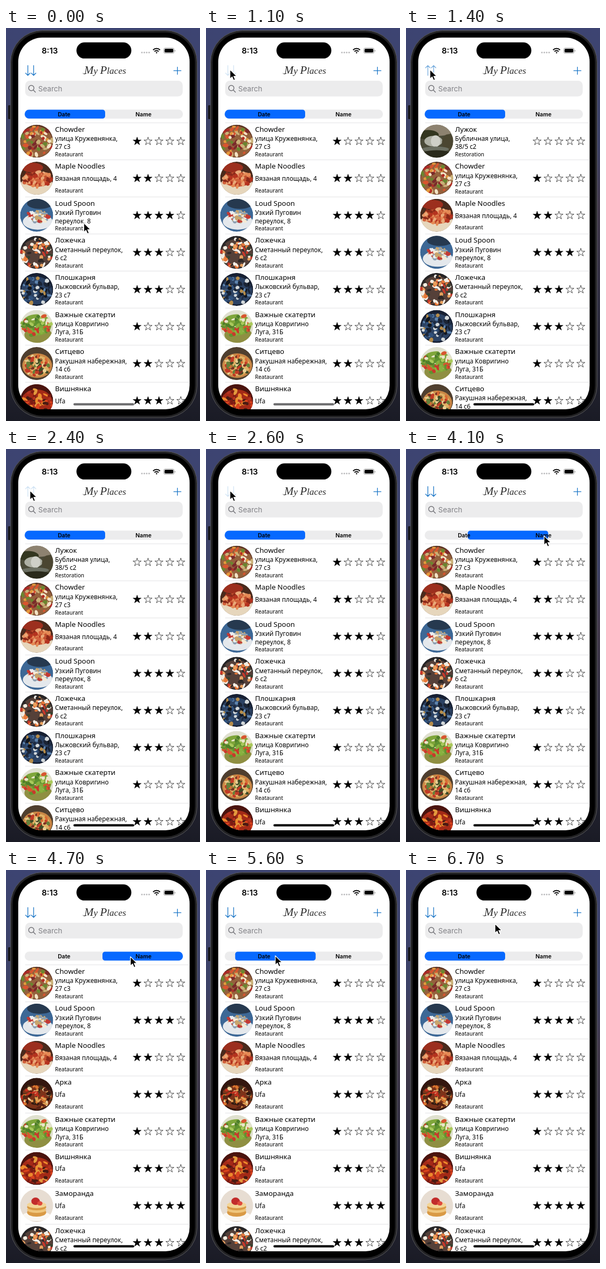
An HTML page that plays this animation: 364x738 px, repeating every 6800 ms.

```html
<!DOCTYPE html>
<html lang="ru">
<head>
<meta charset="utf-8">
<title>My Places</title>
<style>
  html, body { margin: 0; width: 100%; height: 100%; overflow: hidden; background: #1b1c27; }
  svg { display: block; width: 364px; height: 738px; }
  text { font-family: "Noto Sans", "Open Sans", sans-serif; fill: #000; }
  .ui { font-family: Inter, "Liberation Sans", sans-serif; }
  .script { font-family: "Liberation Serif", "Noto Serif", serif; font-style: italic; font-size: 17.5px; fill: #2a2a2a; }
  .script .cap { font-size: 21px; }
  .name { font-size: 13.3px; }
  .addr { font-size: 11.8px; }
  .kind { font-size: 10.1px; }
  .seg { font-size: 10.6px; font-weight: 600; text-anchor: middle; }
  .line { fill: none; stroke: #1874c6; stroke-width: 1.3; stroke-linecap: round; stroke-linejoin: round; }
</style>
</head>
<body>
<svg viewBox="0 0 364 738">
  <defs>
    <linearGradient id="wall" x1="0" y1="0" x2="0" y2="1">
      <stop offset="0" stop-color="#3d4472"/>
      <stop offset=".3" stop-color="#3d4266"/>
      <stop offset=".45" stop-color="#433a4c"/>
      <stop offset=".7" stop-color="#302f42"/>
      <stop offset="1" stop-color="#1a1b25"/>
    </linearGradient>
    <clipPath id="screen"><rect x="23" y="18" width="321.5" height="698" rx="45"/></clipPath>
    <clipPath id="disc"><circle cx="57.5" cy="34.5" r="31"/></clipPath>
    <clipPath id="track"><rect x="35" y="153.3" width="297" height="16.9" rx="8.4"/></clipPath>
    <path id="star" d=""/>
  </defs>

  <rect width="364" height="738" fill="url(#wall)"/>
  <rect x="4" y="145" width="6" height="26" rx="1.5" fill="#17171a"/>
  <rect x="8.5" y="4.5" width="350" height="727.5" rx="60" fill="#222224" stroke="#58585c"/>
  <rect x="12.5" y="8.5" width="342" height="719.5" rx="56" fill="#000"/>
  <rect x="23" y="18" width="321.5" height="698" rx="45" fill="#fff"/>

  <g clip-path="url(#screen)">
    <g id="lists"></g>

    <text class="ui" x="67" y="47.5" font-size="15" font-weight="600">8:13</text>
    <rect x="132.2" y="27" width="103" height="30.3" rx="15.1"/>
    <g fill="#b9b9bb">
      <circle cx="255" cy="46" r="1.5"/><circle cx="259.5" cy="46" r="1.5"/>
      <circle cx="264" cy="46" r="1.5"/><circle cx="268.5" cy="46" r="1.5"/>
    </g>
    <g fill="none" stroke="#000" stroke-width="2">
      <path d="M276 41.3a9.2 9.2 0 0 1 13 0M278.6 44a5.5 5.5 0 0 1 7.8 0"/>
      <path d="M282.5 48l-1.8-2a2.6 2.6 0 0 1 3.6 0z" fill="#000" stroke="none"/>
    </g>
    <rect x="296" y="37.6" width="19.5" height="10" rx="3" fill="none" stroke="#999"/>
    <rect x="297.5" y="39.1" width="16.5" height="7" rx="1.8"/>
    <path d="M316.7 41v3.4q1.3-.5 1.3-1.7t-1.3-1.7z" fill="#999"/>

    <g id="sort" class="line">
      <path d="M41 70.5V89M36.8 84.8L41 89l4.2-4.2M51.8 70.5V89M47.6 84.8l4.2 4.2 4.2-4.2"/>
    </g>
    <text class="script" x="186" y="86" text-anchor="middle"><tspan class="cap">M</tspan>y <tspan class="cap">P</tspan>laces</text>
    <path d="M150 85.5q-4.500 2.500-5.500-1" fill="none" stroke="#2a2a2a" stroke-width=".8"/>
    <path class="line" stroke-width="1.5" d="M314.8 80.2h13.6M321.6 73.4v13.6"/>

    <rect x="36" y="99" width="295.5" height="29.5" rx="8.5" fill="#ececed"/>
    <g fill="none" stroke="#717176" stroke-width="1.4" stroke-linecap="round">
      <circle cx="47.5" cy="112.8" r="5"/><path d="M51.2 116.600l4 4"/>
    </g>
    <text class="ui" x="60.5" y="119" font-size="13.6" style="fill:#808085">Search</text>

    <g clip-path="url(#track)">
      <rect x="35" y="153" width="297" height="18" fill="#ececed"/>
      <rect id="knob" x="35" y="153.3" width="151" height="16.9" rx="5" fill="#0769ff"/>
    </g>
    <text class="ui seg" x="109" y="165.5">Date</text>
    <text class="ui seg" x="258" y="165.5">Name</text>

    <rect id="home" x="126.500" y="704.6" width="114" height="4.1" rx="2"/>
  </g>

  <path id="cursor" d="M0 0V17.5L4 13.7 6.8 20.2 9.8 18.9 7 12.6H12.5Z" stroke="#fff" stroke-width="1.2" stroke-linejoin="round"/>
</svg>

<script>
const $ = id => document.getElementById(id);
const LOOP = 6800, FRAME = 100, TOP = 178, PITCH = 69.6;

// Photo: ground colour, large ellipses [colour, cx, cy, rx, ry], colours of the scattered bits
const places = {
  chowder: {
    name: 'Chowder', addr: ['улица Кружевнянка,', '27 с3'], stars: 1,
    photo: ['#5c3523', [['#94613c', 0, 1, 30, 29]], '#b22d26 #e39a3d #6a852f #f2e3c4 #7a2a2a #d9552f #c9b077']
  },
  noodles: {
    name: 'Maple Noodles', addr: ['Вязаная площадь, 4'], stars: 2,
    photo: ['#4a2a1c', [['#9c2f1e', -8, -20, 20, 9], ['#e6d6bc', 0, 14, 31, 17], ['#c2502f', 1, 2, 27, 14]],
      '#d2623c #b5331f #e9a878 #e58a55 #8d2a1a']
  },
  spoon: {
    name: 'Loud Spoon', addr: ['Узкий Пуговин', 'переулок, 8'], stars: 4,
    photo: ['#3d6896', [['#26394f', 6, -22, 24, 10], ['#e4e8ec', 2, 12, 28, 15], ['#e2cfae', 3, 3, 20, 10]],
      '#f4ead4 #c23a35 #c9a56c #8da0b2 #e9eef2']
  },
  lozhechka: {
    name: 'Ложечка', addr: ['Сметанный переулок,', '6 с2'], stars: 3,
    photo: ['#262425', [['#554039', 0, 2, 30, 27]], '#e8793a #f2ece0 #c8382a #e9a05d #37412e #f4efe6 #2d2726']
  },
  ploshka: {
    name: 'Плошкарня', addr: ['Лыжовский бульвар,', '23 с7'], stars: 3,
    photo: ['#172033', [['#2c4263', 0, 2, 29, 26]], '#1a2435 #5d83ad #d3d8da #b58c4a #30517c #11161f #1d2a40']
  },
  skaterti: {
    name: 'Важные скатерти', addr: ['улица Ковригино', 'Луга, 31Б'], stars: 1,
    photo: ['#dfe0cf', [['#8f8f42', 3, 16, 26, 15], ['#7fa63a', 0, -3, 28, 20]],
      '#5f9230 #c9392c #a9c95b #e9e6c8 #88b03f #d8562f #4f7f2a']
  },
  sitsevo: {
    name: 'Ситцево', addr: ['Ракушная набережная,', '14 с6'], stars: 2,
    photo: ['#4f3f2f', [['#c98745', 1, 4, 28, 23], ['#dfb064', 1, 4, 24, 19]], '#c23a25 #e8cf93 #66803a #d96a33 #7b2f22 #3f4a26']
  },
  vishnya: {
    name: 'Вишнянка', addr: ['Ufa'], stars: 3,
    photo: ['#4a130e', [['#a42a17', 0, 4, 30, 25]], '#d9431d #ee8a2c #7d1a12 #e39a3d #4a1a12 #b53320']
  },
  meadow: {
    name: 'Лужок', addr: ['Бубличная улица,', '38/5 с2'], stars: 0, kind: 'Restoration',
    photo: ['#4a4a38', [['#8d8270', 4, -24, 30, 14], ['#33361f', -16, -12, 20, 9], ['#aeb0a4', -6, 0, 17, 10],
      ['#cfd0c8', -2, 0, 9, 11], ['#4b4631', 22, 2, 12, 15], ['#6c7063', -2, 15, 25, 5], ['#2a2a1b', 0, 26, 31, 9]], '']
  },
  arka: {
    name: 'Арка', addr: ['Ufa'], stars: 3,
    photo: ['#33170f', [['#7d3319', 0, 5, 30, 22]], '#c4301f #e0a052 #5a2214 #d8742d #46341c #efd09a #34180f']
  },
  zamor: {
    name: 'Заморанда', addr: ['Ufa'], stars: 5,
    photo: ['#e7ddd2', [['#faf7f2', 0, 20, 27, 9], ['#d99a45', 0, 13, 18, 8], ['#efc67d', 0, 8, 18, 6],
      ['#d99a45', 0, 3, 18, 6], ['#f3d595', 0, -1, 18, 6], ['#c22c2b', -2, -8, 8, 7], ['#df4a3c', 6, -4, 5, 4]], '']
  }
};

const byDate = ['chowder', 'noodles', 'spoon', 'lozhechka', 'ploshka', 'skaterti', 'sitsevo', 'vishnya'];
const orders = {
  date: byDate,
  reversed: ['meadow', ...byDate.slice(0, 7)],
  name: ['chowder', 'spoon', 'noodles', 'arka', 'skaterti', 'vishnya', 'zamor', 'lozhechka']
};

function randomFrom(seed) {
  return () => (seed = (seed * 16807) % 2147483647) / 2147483647;
}

function photo([ground, shapes, bits], seed) {
  const rnd = randomFrom(seed * 7919 + 17);
  const ellipse = (c, x, y, rx, ry, a = 0) =>
    `<ellipse rx="${rx}" ry="${ry}" fill="${c}" transform="translate(${57.5 + x} ${34.5 + y}) rotate(${a})"/>`;
  let out = `<circle cx="57.5" cy="34.5" r="31" fill="${ground}"/>` + shapes.map(s => ellipse(...s)).join('');
  if (bits) {
    const colours = bits.split(' '), [, cx, cy, rx, ry] = shapes[shapes.length - 1];
    for (let i = 0; i < 64; i++) {
      const a = rnd() * 6.283, d = Math.sqrt(rnd());
      out += ellipse(colours[i % colours.length], cx + Math.cos(a) * d * rx, cy + Math.sin(a) * d * ry,
        2.5 + rnd() * 3.5, 1.6 + rnd() * 2.2, rnd() * 180);
    }
  }
  return `<g clip-path="url(#disc)">${out}</g>`;
}

function row(key, i) {
  const p = places[key], two = p.addr.length > 1;
  const text = (cls, y, s) => `<text class="${cls}" x="92" y="${y}">${s}</text>`;
  let out = photo(p.photo, Object.keys(places).indexOf(key) + 1) + text('name', 16.5, p.name);
  p.addr.forEach((s, n) => out += text('addr', two ? 34 + n * 15.4 : 39.4, s));
  out += text('kind', two ? 63 : 61.2, p.kind || 'Reataurant');
  for (let n = 0; n < 5; n++)
    out += `<use href="#star" x="${246 + n * 20.5}" y="34.8" fill="${n < p.stars ? '#000' : '#fff'}" stroke="#000" stroke-width=".7"/>`;
  return `<g transform="translate(0 ${TOP + i * PITCH})"><path d="M36 0H345" stroke="#dadadc" stroke-width=".8"/>${out}</g>`;
}

$('star').setAttribute('d', 'M' + Array.from({ length: 10 }, (_, i) => {
  const a = i * Math.PI / 5, r = i % 2 ? 3.05 : 8;
  return `${(Math.sin(a) * r).toFixed(2)} ${(-Math.cos(a) * r).toFixed(2)}`;
}).join('L') + 'Z');

$('lists').innerHTML = Object.keys(orders)
  .map(k => `<g id="${k}">${orders[k].map(row).join('')}</g>`).join('');

// Eased value between keys of the form [time, ...values]
function track(keys, t) {
  const n = keys.findIndex(k => k[0] > t);
  if (n < 0) return keys[keys.length - 1].slice(1);
  if (n === 0) return keys[0].slice(1);
  const a = keys[n - 1], b = keys[n], u = (t - a[0]) / (b[0] - a[0]), e = u * u * (3 - 2 * u);
  return a.slice(1).map((v, i) => v + (b[i + 1] - v) * e);
}

const cursorKeys = [
  [0, 146, 366], [600, 45, 78], [2600, 45, 78], [3000, 224, 194], [3100, 233, 196], [3200, 233, 196],
  [3800, 259, 163], [4500, 259, 163], [5200, 130, 161], [6100, 130, 161], [6300, 167, 161],
  [6400, 167, 161], [6700, 167, 101]
];
const knobKeys = [[3950, 35], [4230, 181], [5400, 181], [5660, 35]];
const sortKeys = [[1000, 1], [1100, .2], [1300, .2], [1500, 1], [2300, 1], [2400, .2], [2600, .2], [2800, 1]];

function draw(t) {
  const order = t >= 4200 ? 'name' : t >= 1300 && t < 2600 ? 'reversed' : 'date';
  for (const k in orders) $(k).style.display = k === order ? '' : 'none';
  $('sort').setAttribute('transform', order === 'reversed' ? 'matrix(1 0 0 -1 0 159.5)' : '');
  $('sort').setAttribute('opacity', track(sortKeys, t)[0]);
  $('knob').setAttribute('x', track(knobKeys, t)[0]);
  $('home').setAttribute('fill', t < 1300 ? '#6c6c6e' : '#000');
  $('cursor').setAttribute('transform', `translate(${track(cursorKeys, t)})`);
}

const start = performance.now();
function tick() {
  const t = (performance.now() - start) % LOOP;
  draw(Math.floor(t / FRAME) * FRAME);
  requestAnimationFrame(tick);
}
tick();
</script>
</body>
</html>
```
